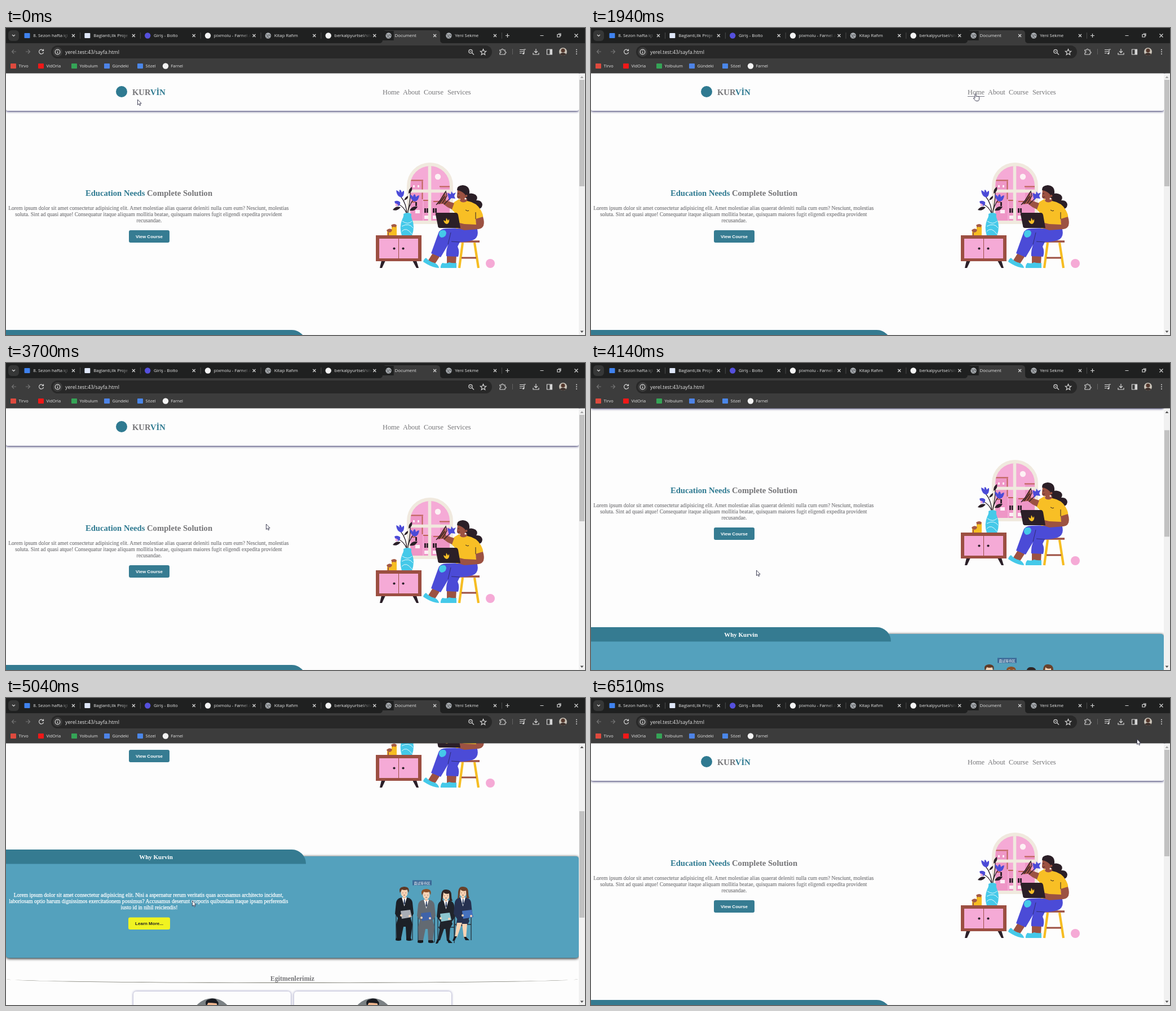
Animation, 1027 px wide and 545 px high, one loop 6550 ms. Source, as an HTML page:

```html
<!DOCTYPE html>
<html lang="tr">
<head>
<meta charset="utf-8">
<title>Document</title>
<style>
  html, body { margin: 0; width: 100%; height: 100%; overflow: hidden; background: #fdfdfd; }
  svg { display: block; }
  text { font-family: "Liberation Serif", serif; fill: #757578; }
  .mid { text-anchor: middle; }
  .para { font-size: 9.55px; text-anchor: middle; stroke: #757578; stroke-width: .15; }
  .white { fill: #fff; }
  .para.white { stroke: #fff; stroke-width: .25; }
  .bold { font-weight: bold; }
  .btn { font: bold 8px "Liberation Sans", sans-serif; text-anchor: middle; }
  .nav { font-size: 12.3px; }
  .ui text { font: 7.9px "Open Sans", sans-serif; fill: #e6e6e6; }
  .ui .mark text { font-size: 7.4px; }
  .ui .url { font-size: 8.8px; }
  .line { fill: none; stroke: #d5d5d5; stroke-width: 1.2; }
  .dim { stroke: #747474; }
  .teal { fill: #2f7a91; }
  .head { filter: drop-shadow(0 1px 2px #1c1a55); }
  .panel { filter: drop-shadow(0 1px 2.5px #000); }
  .card { filter: drop-shadow(0 0 2px #4a4a90b0); }
</style>
</head>
<body>
<svg width="1027" height="545" viewBox="0 0 1027 545">
  <defs>
    <linearGradient id="fade"><stop stop-color="#1f2020" stop-opacity="0"/><stop offset="1" stop-color="#1f2020"/></linearGradient>
    <clipPath id="arch"><path d="M717 342V280a35 35 0 0 1 70 0V342Z"/></clipPath>
    <clipPath id="face"><circle cx="988" cy="42" r="7"/></clipPath>
    <clipPath id="round"><circle r="36"/></clipPath>
  </defs>
  <rect width="1027" height="545" fill="#fdfdfd"/>

  <g id="page">
    <rect class="head" y="70" width="1016" height="77" rx="3" fill="#fdfdfd"/>
    <circle cx="205" cy="113" r="10" class="teal"/>
    <text x="224" y="118.5" class="bold" font-size="14.6">KUR<tspan class="teal">VİN</tspan></text>
    <g id="nav"></g>

    <text x="253.5" y="298" class="mid bold" font-size="14.67"><tspan class="teal">Education Needs</tspan> Complete Solution</text>
    <text class="para" y="322.500">
      <tspan x="254">Lorem ipsum dolor sit amet consectetur adipisicing elit. Amet molestiae alias quaerat deleniti nulla cum eum? Nesciunt, molestias</tspan>
      <tspan x="254" dy="11.2">soluta. Sint ad quasi atque! Consequatur itaque aliquam mollitia beatae, quisquam maiores fugit eligendi expedita provident</tspan>
      <tspan x="254" dy="11.2">recusandae.</tspan>
    </text>
    <rect x="218" y="359" width="72" height="22" rx="3" fill="#367c92"/>
    <text x="254" y="373" class="btn white">View Course</text>

    <g id="hero">
      <path fill="#f0e9de" d="M711 348V280a41 41 0 0 1 82 0V348Z"/>
      <g clip-path="url(#arch)">
        <path fill="#f5aad6" d="M710 240h80v104h-80z"/>
        <path fill="#ee96c6" d="M718 271h21v72h-21zM770 282h18v61h-18zM741 306h30v37h-30z"/>
        <path fill="none" stroke="#bd6357" stroke-width="2" d="M716 270.500h24M738.500 272v32M769 281.500h20M740 306h14M719 309h8M758 308h14"/>
        <path fill="#30202b" d="M742 320h3v8h-3zM746 320h3v8h-3zM757 320h3v8h-3zM761 320h3v8h-3zM726 309h3v7h-3z"/>
        <path fill="#fdeef6" d="M726 323h8v6h-8zM742 333h7v6h-7zM757 333h8v6h-8zM722 279h3v4h-3zM730 279h3v4h-3z"/>
        <circle cx="766" cy="264" r="5.200" fill="#fdf1f4"/>
        <path stroke="#f0e9de" stroke-width="5.500" d="M751.500 240v105M711 289.500h82"/>
      </g>
      <!-- flowers and vase -->
      <path fill="none" stroke="#2b2029" stroke-width="1.300" d="M711 333C711 317 706 306 700 299M712 333C713 319 717 311 724 303M711 330C708 321 701 315 696 313M712 330C715 316 718 302 717 291"/>
      <path fill="#2b2029" d="M714 294q0-9 6-12q2 8-6 12M700 318q-9-3-14 5q8 3 14-5M716 324q4-9 14-7q-4 9-14 7M706 306q2-6 7-8q1 6-7 8"/>
      <path fill="#4b4bd7" d="M692 288q4 1 6 4q-1-4 1-5q3 2 3 5q2-3 4-3q1 9-5 12q-8-2-9-13M716 296q4 0 6 4q0-4 3-5q2 2 2 5q3-3 6-3q-1 10-8 11q-7-2-9-12M689 308q5-3 10 1q1 5-3 7q-5-1-7-8"/>
      <path fill="#f5aad6" d="M691 311l5 3-5 3z"/>
      <path fill="#45c9e9" d="M705 330q7-4 14 0q-1 5 1 9q6 13 0 30h-18q-5-16 1-30q3-5 2-9"/>
      <path fill="none" stroke="#f3fbfd" stroke-width=".9" d="M703 343q10 7 17 0M702 352q13-7 20 3M702 361q8-9 18 5"/>
      <!-- cabinet and candles -->
      <path fill="#f6bd22" d="M676 358h10v10h-10zM684 350h9v18h-9z"/>
      <path fill="#a45a45" d="M675 359q5-5 10-1l-1 3q-4 4-8 0zM683 350q6-4 10 0l-2 4q-3-2-6 0zM677 363h2v5h-2z"/>
      <path fill="#2b2029" d="M666 413h7l-6 13h-4zM721 413h7l4 13h-4z"/>
      <path fill="#9c4f42" d="M656 368h81v46h-81z"/>
      <path fill="#f5aad6" d="M662 374h69v35h-69z"/>
      <path stroke="#9c4f42" d="M696.500 373v37"/>
      <circle cx="688.500" cy="391.500" r="2.100" fill="#2b2029"/><circle cx="704.500" cy="391.500" r="2.100" fill="#2b2029"/>
      <!-- stool -->
      <path fill="none" stroke="#f6bd22" stroke-width="4.200" d="M810 381L804 426M831 381L838 426"/>
      <path stroke="#9c4f42" stroke-width="3" d="M808 408h26"/>
      <path stroke="#9c4f42" stroke-width="3.500" d="M801 379h39"/>
      <circle cx="859" cy="418" r="8" fill="#f5aad6"/>
      <!-- seated figure -->
      <path fill="#9c5242" d="M758 398l13 5-11 17-12-6zM782 403h17l-1 16h-16z"/>
      <path fill="#45c9e9" d="M745 408q6 7 15 9q7 3 8 9q-12 0-28-11q1-5 5-7M774 417q8 2 12-1q6 2 13 1v9h-28q-1-5 3-9"/>
      <path fill="#4b4bd7" d="M835 354q6 18-8 23q-10 3-22 3l-4 8q4 8 1 18l-21-1q-1-10 3-20l-13 22-17-7 13-36q3-8 14-8z"/>
      <path fill="none" stroke="#2f2b74" stroke-width="1" d="M784 384l5-21M805 380l-15-1"/>
      <path fill="#45c9e9" d="M770 360q10-4 11 4q-1 8-9 8q-7-4-2-12"/>
      <path fill="#2b1f27" d="M816 296q9-5 17 0q5 5 1 10q10-1 11 8q-1 8-11 8q-5-2-4-8q-10 0-14-9z"/>
      <path fill="#9c5242" d="M801 287q8-7 16 1l1 20q-7 6-13-1l1-4q-7 1-6-6z"/>
      <path fill="#2b1f27" d="M800 288q-1-8 10-9q13 1 12 14q-1 8-6 10l-2-8q-6-6-14-7"/>
      <circle cx="816.500" cy="298" r="2" fill="#9c5242"/><circle cx="815" cy="303" r="1.600" fill="#fff"/>
      <path fill="none" stroke="#2b1f27" stroke-width=".8" d="M801 294h3M801 300q3 1 4-1"/>
      <path fill="#f8bf25" d="M805 307q6 5 13 0q17 3 24 16q5 9 4 13l-13 4 3 16h-38l-1-27-8-9 6-11q5-3 10-6"/>
      <path fill="none" stroke="#2b1f27" d="M833 327v12M815 323q4 3 6 1"/>
      <path fill="#9c5242" d="M791 322l-8-4-8-6-11 1 6-8 8-14 3 9-1 6 15 5zM833 339l13-4q6 20-8 22l-25 2-15-5 2-9 13 3 21 1z"/>
      <path fill="none" stroke="#2b1f27" stroke-width="1.300" d="M763 314l7-8 10-16 2 8-8 13M768 312l10-13M777 313l12-12"/>
      <path fill="#4b4bd7" d="M783 293l6 2 1-5 3 4 5-2-3 6 2 5-7-1-4 4z"/>
      <path fill="#2b1f27" d="M764 328h34q3 0 4 4l4 23h-36q-4 0-4-4l-4-20q-1-3 2-3"/>
      <path fill="#f8bf25" d="M776 341l4 2 1-6 3 5 2-3q1 8-4 9q-5-1-6-7"/>
    </g>

    <rect class="panel" y="548" width="1016" height="180.500" rx="5" fill="#54a1bd"/>
    <path fill="#357b91" d="M0 536H507a25 25 0 0 1 25 25.500H0Z"/>
    <text x="266" y="552.500" class="mid bold white" font-size="11">Why Kurvin</text>
    <text class="para white" y="619.500">
      <tspan x="254">Lorem ipsum dolor sit amet consectetur adipisicing elit. Nisi a aspernatur rerum veritatis quas accusamus architecto incidunt,</tspan>
      <tspan x="254" dy="11.2">laboriosam optio harum dignissimos exercitationem possimus? Accusamus deserunt corporis quibusdam itaque ipsam perferendis</tspan>
      <tspan x="254" dy="11.2">iusto id in nihil reiciendis!</tspan>
    </text>
    <rect x="217" y="656.500" width="74" height="21.500" rx="3" fill="#f0f321"/>
    <text x="254" y="670" class="btn" style="fill:#202020">Learn More...</text>
    <rect x="721" y="590.500" width="34" height="9" fill="#3c6997"/>
    <text x="738" y="597.500" class="mid white" style="font:5.800px 'Noto Sans CJK SC',sans-serif">面试等待区</text>
    <g id="people"></g>

    <path fill="#77776c" d="M0 766A508 7 0 0 0 1016 766A508 6.100 0 0 1 0 766"/>
    <text x="508" y="769" class="mid bold" font-size="11.8">Egitmenlerimiz</text>
    <g id="cards"></g>
  </g>

  <g>
    <path fill="#f1f1f1" d="M1016 81h11v464h-11z"/>
    <rect id="thumb" x="1017" y="92" width="9" height="189" fill="#c1c1c1"/>
    <path id="up" d="M1018.500 89l3-3.500 3 3.500z"/>
    <path fill="#505050" d="M1018.500 537.500l3 3.500 3-3.500z"/>
  </g>

  <g class="ui">
    <path fill="#1f2020" d="M0 0h1027v28H0z"/>
    <path fill="#3c3c3c" d="M0 27h662q6 0 6-6V10q0-6 6-6h90q6 0 6 6v11q0 6 6 6h251v53.500H0z"/>
    <rect x="4" y="4" width="19" height="19" rx="6" fill="#363737"/>
    <path class="line" d="M11 12l2.500 2.500L16 12M886 13.500h7M889.500 10v7M947.500 13.500h6"/>
    <path class="line" d="M978 11.500h4.500v4.500H978zM979.500 10h4.500v4.500M1008.500 10.500l6 6M1014.500 10.500l-6 6"/>
    <g id="tabs"></g>
    <rect x="80" y="31" width="782" height="23" rx="11.500" fill="#282828"/>
    <path class="line dim" d="M18 42h-7M14 38.500L10.500 42l3.500 3.500M35 42h7M39 38.500l3.500 3.500-3.500 3.500"/>
    <path class="line" d="M66 40a4 4 0 1 0 .5 3M66.500 37.500V40.500h-3"/>
    <circle cx="91.500" cy="42.500" r="8.500" fill="#3c3c3c"/>
    <circle class="line" cx="91.500" cy="42.500" r="4.300"/>
    <path class="line" d="M91.500 42v3M91.500 39.800v1"/>
    <text class="url" x="105" y="45.500">yerel.test:43/sayfa.html</text>
    <circle class="line" cx="824" cy="41.500" r="3.200"/>
    <path class="line" d="M826.500 44l3.500 3.500M822.500 41.500h3M846.500 37.500l1.500 3.500 3.700.3-2.800 2.500.8 3.700-3.200-2-3.200 2 .8-3.700-2.800-2.500 3.700-.3z"/>
    <path class="line" d="M876 39h3q0-2 1.500-2t1.500 2h3v3q2 0 2 1.500t-2 1.500v2h-9v-3q2 0 2-1.500t-2-1.500z"/>
    <path stroke="#626262" d="M898.500 37v10"/>
    <path class="line" d="M911 38.500h7M911 41.500h7M911 44.500h4M919 45v-7h3M940 37v6.500M937 41l3 3 3-3M935 44v3h10v-3M959.500 38h9v9h-9z"/>
    <circle cx="917.700" cy="45.200" r="1.600" fill="#d5d5d5"/>
    <path fill="#d5d5d5" d="M964.500 38h4v9h-4z"/>
    <g clip-path="url(#face)">
      <path fill="#c9c3b8" d="M980 34h16v16h-16z"/>
      <circle cx="988" cy="40" r="3.600" fill="#54382d"/><ellipse cx="988" cy="49" rx="6.500" ry="5" fill="#3c302c"/>
    </g>
    <g fill="#d5d5d5"><circle cx="1012" cy="38.500" r="1"/><circle cx="1012" cy="42.200" r="1"/><circle cx="1012" cy="46" r="1"/></g>
    <g id="marks" class="mark"></g>
  </g>

  <g id="cursor" stroke="#33334a" stroke-width=".9" fill="#fff" stroke-linejoin="round">
    <path id="arrow" d="M.5 0V9.500L2.700 7.500 4.200 10.800 5.700 10.100 4.300 7H7.200Z"/>
    <path id="hand" d="M-2 7.500V1q0-1.200 1-1.200T0 1v3.500q1-1 2 0q1-.8 2 .2q1.500-.6 1.500 1V9q0 2-1.500 3.500H-.5L-4.500 8q0-1.500 1.200-1z"/>
  </g>
</svg>
<script>
const $ = id => document.getElementById(id);
const fill = (id, items, draw) => $(id).innerHTML = items.map(draw).join('');

const links = [['Home', 668, 698], ['About', 704, 735], ['Course', 741, 776], ['Services', 783, 824]];
fill('nav', links, ([name, a, b]) => `<text class="nav" x="${a}" y="117.500">${name}</text>
  <path class="under" stroke="#7a7a85" d="M${a} 121.500H${b}"/>`);

const dot = (x, y, color) => `<circle cx="${x}" cy="${y}" r="5.200" fill="${color}"/>`;
const square = (x, y, color) => `<rect x="${x - 5}" y="${y - 4.5}" width="10" height="9" rx="1" fill="${color}"/>`;
const globe = (x, y) => dot(x, y, '#a9adb1') +
  `<path d="M${x - 4} ${y - 2}q3 3 5 1t3 2M${x - 3} ${y + 3}q3-3 5 1" fill="none" stroke="#404245"/>`;

const tabs = [
  ['8. Sezon hafta içi', square, '#3f82ee'], ['Baglanti,Ilk Proje', square, '#dfe7f8'],
  ['Giriş - Bolto', dot, '#5550dd'], ['pixmolu - Farnel Arama', dot, '#f4f4f4'],
  ['Kitap Rafım', globe], ['berkalpyurtsel/site', dot, '#f4f4f4'],
  ['Document', globe], ['Yeni Sekme', globe]];
fill('tabs', tabs, ([name, icon, color], i) => {
  const x = 37.5 + i * 106.85;
  const long = name.length > 14;
  const cover = `<path fill="url(#fade)" d="M${x + 60} 5h16v17h-16z"/><path fill="#1f2020" d="M${x + 76} 5h40v17h-40z"/>`;
  const edge = i == 5 || i == 6 ? '' : `<path stroke="#4a4b4b" d="M${x + 94} 8v11"/>`;
  return `${icon(x, 13.5, color)}<text x="${x + 10.800}" y="16.200">${name}</text>${long ? cover : ''}
    <path class="line" d="M${x + 79.5} 11l5 5m0-5l-5 5"/>${edge}`;
});

const marks = [[8, 'Tirvo', square, '#de4a3e'], [57, 'VidOrla', square, '#f01818'], [116, 'Yolbulum', square, '#35a456'],
  [174, 'Gündeki', square, '#4d83e6'], [233, 'Sözel', square, '#4a86e8'], [278, 'Farnel', dot, '#f4f4f4']];
fill('marks', marks, ([x, name, icon, color]) =>
  `${icon(x + 5, 67.5, color)}<text x="${x + 14.500}" y="70">${name}</text>`);

const skin = '#f7d3b4';
const trousers = color => `<path d="M-10 44H11l4 14-3 24H4l-1-20h-4l-4 20h-8l-1-24z" fill="${color}"/>
  <path d="M-14 82h9v4q-5 2-10 0zM4 82h8l2 4q-5 2-10 0z" fill="#181b20"/>`;
const sideways = (color, calf) => `<path d="M-9 44H9l3 8-5 9h-19z" fill="${color}"/>
  <path d="M-10 55h9l-9 26h-4zM-1 57h9l-2 25H2z" fill="${calf}"/>
  <path d="M-10 79l-5 8h-3l3-8zM2 80h4l6 6H5z" fill="#181b20"/>`;
const shortHair = 'M-7 2q-4-10 7-11q11 0 8 11l-2-6q-5 2-10 0z';
const longHair = 'M-9 12q1-6 1-12q1-10 9-9q9 0 9 10q0 6 2 10l-5 1-1-14q-7 2-10-2l-2 15z';

// x, head y, hair shape and color, suit, folder color and shift, legs
const people = [
  [706, 611, shortHair, '#5f3a26', '#1c2027', '#a9adb5', 3, trousers('#1c2027')],
  [745, 615, shortHair, '#8a5128', '#636a72', '#3f63a9', 0, trousers('#636a72')],
  [780, 616, longHair, '#2f2625', '#20242b', '#8cc6cf', -1, sideways('#20242b', '#20242b')],
  [810, 611, longHair, '#68412b', '#263150', '#4571bd', 8, sideways('#263150', skin)]];
fill('people', people, ([x, y, hair, color, suit, folder, shift, legs]) => `<g transform="translate(${x} ${y})">
  <path d="M-14 36V86M15 36V86M-14 58H15" stroke="#25303b" stroke-width="1.300" fill="none"/>${legs}
  <path d="M-4 10H5q9 2 10 9l2 20-6 9h-21l-6-9 2-20q1-7 10-9" fill="${suit}"/>
  <path d="M-4 10H5L.5 26z" fill="#fff"/><path d="M0 13h1.400l.6 8-1.300 2-1.300-2z" fill="#28395c"/>
  <path d="M-2 6h5v5l-2.500 2-2.500-2z" fill="#e9bd9c"/><ellipse cx=".5" cy="1.500" rx="6" ry="8" fill="${skin}"/>
  <path d="${hair}" fill="${color}"/>
  <path d="M-3 2h1.500M2.500 2h1.500M-1 6h3" stroke="#67443a" stroke-width=".8"/>
  <path d="M${shift - 9} 34l17-2 3 13-18 3z" fill="${folder}"/>
  <circle cx="${shift - 8}" cy="42" r="2" fill="${skin}"/><circle cx="${shift + 7}" cy="43" r="2" fill="${skin}"/></g>`);

fill('cards', [365.5, 650.5], x => `<rect class="card" x="${x - 139.5}" y="788" width="279" height="180" rx="5" fill="#fdfdfd"/>
  <g transform="translate(${x} 836)"><circle r="36" fill="#7b8184"/><g clip-path="url(#round)">
  <path d="M-9-30H9v18q-4 9-9 9t-9-9z" fill="#efb68f"/>
  <path d="M-10-22q-4-10 4-12q12-4 15 3q4 2 1 9l-2-5q-8-1-15-1z" fill="#181a20"/></g></g>`);

const loop = 6550;
const route = [[0, 233, 127], [970, 272, 162], [1850, 678, 117], [2050, 690, 116], [2300, 724, 116],
  [2550, 762, 116], [2800, 808, 115], [2900, 813, 115], [3150, 811, 117], [4040, 293, 367],
  [4140, 293, 368], [4570, 306, 369], [5050, 330, 360], [5470, 437, 302], [5850, 500, 280], [6510, 968, 73]];
const wheel = [[0, 0], [4040, 0], [4140, 67], [4569, 67], [4570, 267], [5050, 267], [5180, 200],
  [5300, 200], [5430, 134], [5530, 134], [5660, 67], [5730, 67], [5860, 0]];

// Eased values of a list of [time, ...values] keys
function at(keys, t) {
  const i = keys.findIndex(key => key[0] > t);
  if (i < 0) return keys.at(-1).slice(1);
  const [a, b] = [keys[i - 1], keys[i]];
  const p = (t - a[0]) / (b[0] - a[0]);
  const ease = p * p * (3 - 2 * p);
  return a.slice(1).map((v, j) => v + (b[j + 1] - v) * ease);
}

const unders = document.querySelectorAll('.under');
const show = (el, on) => el.setAttribute('visibility', on ? 'visible' : 'hidden');

function draw(now) {
  const t = now % loop;
  const [x, y] = at(route, t).map(Math.round);
  const scroll = Math.round(at(wheel, t)[0]);
  $('page').setAttribute('transform', `translate(0 ${-scroll})`);
  $('thumb').setAttribute('y', 92 + scroll * .408);
  $('up').setAttribute('fill', scroll ? '#505050' : '#a3a3a3');
  $('cursor').setAttribute('transform', `translate(${x} ${y})`);
  const over = links.findIndex(([, a, b]) => !scroll && y > 105 && y < 122 && x >= a && x <= b);
  unders.forEach((el, i) => show(el, i == over));
  show($('hand'), over >= 0);
  show($('arrow'), over < 0);
  requestAnimationFrame(draw);
}
requestAnimationFrame(draw);
</script>
</body>
</html>
```
